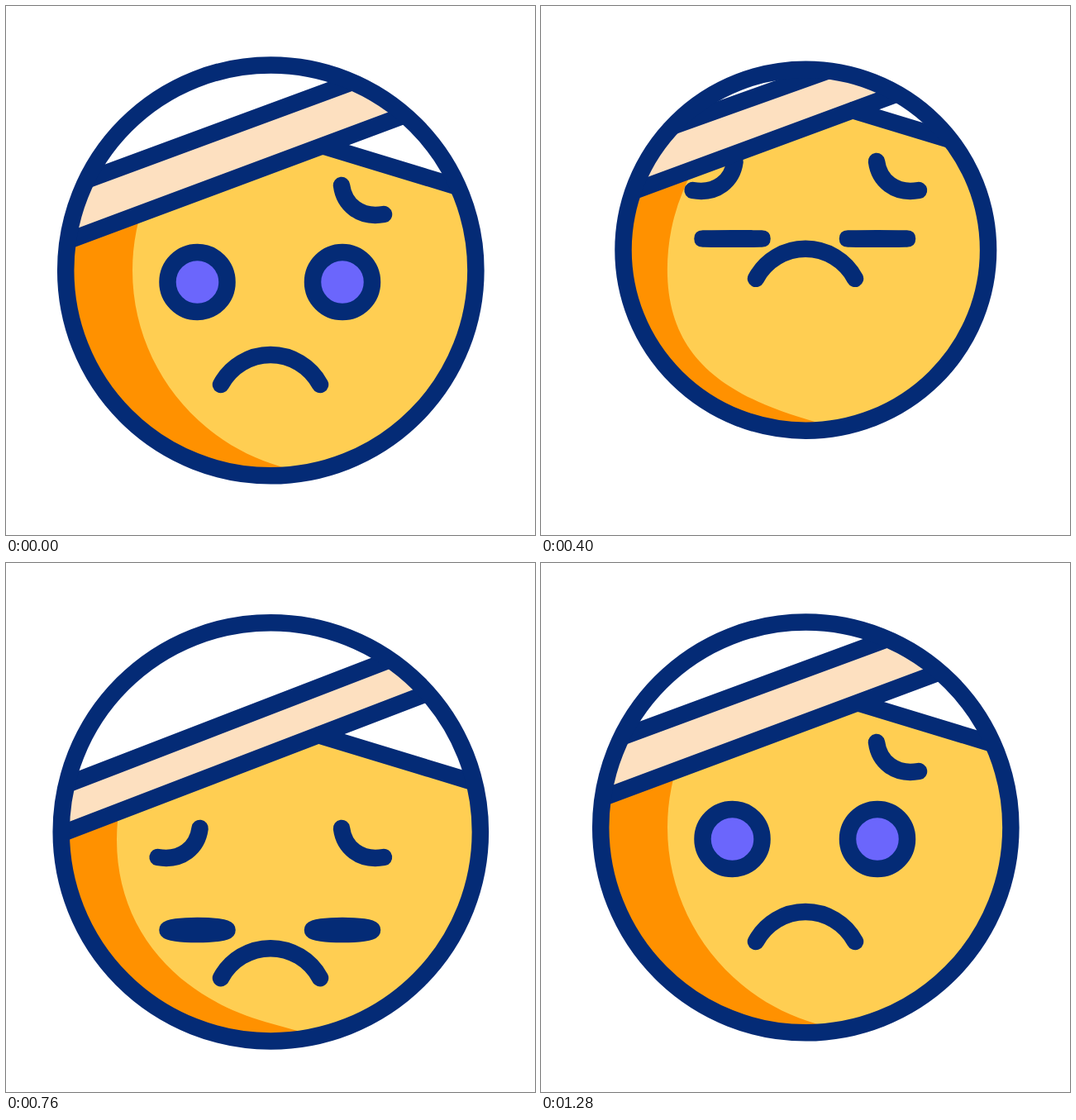
Write an HTML page that moves like this. It is 640 px wide and 640 px high and loops after 2 s.

```html
<!DOCTYPE html>
<html lang="en">
<head>
<meta charset="utf-8">
<title>Bandaged face</title>
<style>
  html, body { margin: 0; width: 100%; height: 100%; overflow: hidden; background: #fff; }
  svg { display: block; width: 100vw; height: 100vh; }
  .line { fill: none; stroke: #042b76; stroke-width: 20.5; stroke-linecap: round; stroke-linejoin: round; }
  .eye { fill: #6b66fc; }
</style>
</head>
<body>
<svg viewBox="0 0 640 640">
  <defs><clipPath id="head"><ellipse class="skull"/></clipPath></defs>
  <g clip-path="url(#head)">
    <rect width="640" height="640" fill="#ff9100"/>
    <path id="light" fill="#ffce52"/>
  </g>
  <path id="browL" class="line" d="M234.6 217C231.6 240 212.6 257 183.6 252"/>
  <path id="browR" class="line" d="M406 217C409 240 428 257 457 252"/>
  <path id="eyeL" class="line" style="fill:#6b66fc"/>
  <path id="eyeR" class="line" style="fill:#6b66fc"/>
  <path id="mouth" class="line" d="M260 458A68 68 0 0 1 380 458"/>
  <g clip-path="url(#head)">
    <path id="cap" fill="#fff"/>
    <path id="band" fill="#fde0c0"/>
    <path id="seams" class="line"/>
  </g>
  <ellipse class="skull line"/>
</svg>
<script>
const LOOP = 2000, STEP = 40, END = 1280;
const $ = id => document.getElementById(id);
const skulls = document.querySelectorAll('.skull');

// Eased 0..1 between two times.
function ramp(t, from, to) {
  const x = Math.min(1, Math.max(0, (t - from) / (to - from)));
  return x * x * (3 - 2 * x);
}

// The nod: rest, raised at `up`, lowered at `down`, held to `back`, at rest by `end`.
function nod(t, up, down, end, back = down) {
  const a = ramp(t, 0, up), b = ramp(t, up, down), c = ramp(t, back, end);
  return (rest, raised, lowered) =>
    rest + (raised - rest) * a + (lowered - raised) * b + (rest - lowered) * c;
}

const draw = (id, d) => $(id).setAttribute('d', d);
const shift = (id, y) => $(id).setAttribute('transform', `translate(0 ${y})`);
const eye = (x, y, r) => `M${x - 36} ${y}a36 ${r} 0 0 1 72 0a36 ${r} 0 0 1 -72 0Z`;

function drawSkull(t) {
  const pose = nod(t, 421, 860, 1090);
  const top = pose(71.5, 76.8, 71.5), bottom = pose(568.3, 513.3, 588.3);
  const shape = {
    cx: 320.3, cy: (top + bottom) / 2,
    rx: pose(248.1, 220.6, 258.6), ry: (bottom - top) / 2
  };
  for (const el of skulls)
    for (const k in shape) el.setAttribute(k, shape[k]);
}

// The lit side is bounded by an arc, a curve to the chin and its tangent.
function drawLight(t, head) {
  const r = 247;
  const x = nod(t, 380, 800, 1280, 860)(153, 153, 133.5);
  const y = head(320, 318, 335);
  const endX = x + 180;
  const endY = nod(t, 400, 900, 1280, 960)(557.4, 503.4, 567.4);
  draw('light', `M640 0H${x + r}V${y - r}A${r} ${r} 0 0 0 ${x} ${y}
    C${x} ${y + 110} ${endX - 106} ${endY - 30} ${endX} ${endY}l300 84H640Z`);
}

function drawWrap(head) {
  const x0 = head(383, 377, 378), y0 = head(169.1, 122.7, 208.4);
  const low = head(.373, .369, .384), high = head(.369, .356, .386);
  const gap = head(63.8, 58.4, 57.6);
  const lower = x => y0 - low * (x - x0);
  const upper = x => y0 - gap - high * (x - x0);
  const side = `L640 ${y0 + .304 * (640 - x0)}`;
  draw('cap', `M0 0V${lower(0)}L${x0} ${y0}${side}V0Z`);
  draw('band', `M0 ${upper(0)}L640 ${upper(640)}V${lower(640)}L0 ${lower(0)}Z`);
  draw('seams', `M0 ${upper(0)}L640 ${upper(640)}M0 ${lower(0)}L640 ${lower(640)}M${x0} ${y0}${side}`);
}

function drawFeatures(t, head) {
  const y = head(334, 274.8, 444.6);
  const lid = Math.max(.2, 36 * (1 - ramp(t, 0, 254) + ramp(t, 701, 951)));
  draw('eyeL', eye(231.5, y, lid));
  draw('eyeR', eye(407, y, lid));
  shift('browR', head(0, -34.5, 104.5));
  shift('browL', head(-23, -34.5, 104.5));
  shift('mouth', nod(t, 351, 791, 1280, 820)(0, -134.4, 46.7));
}

function render(t) {
  const head = nod(t, 349, 775, 1172);
  drawSkull(t);
  drawLight(t, head);
  drawWrap(head);
  drawFeatures(t, head);
}

function tick() {
  const t = performance.now() % LOOP;
  render(Math.min(END, Math.floor(t / STEP) * STEP));
  requestAnimationFrame(tick);
}
tick();
</script>
</body>
</html>
```
